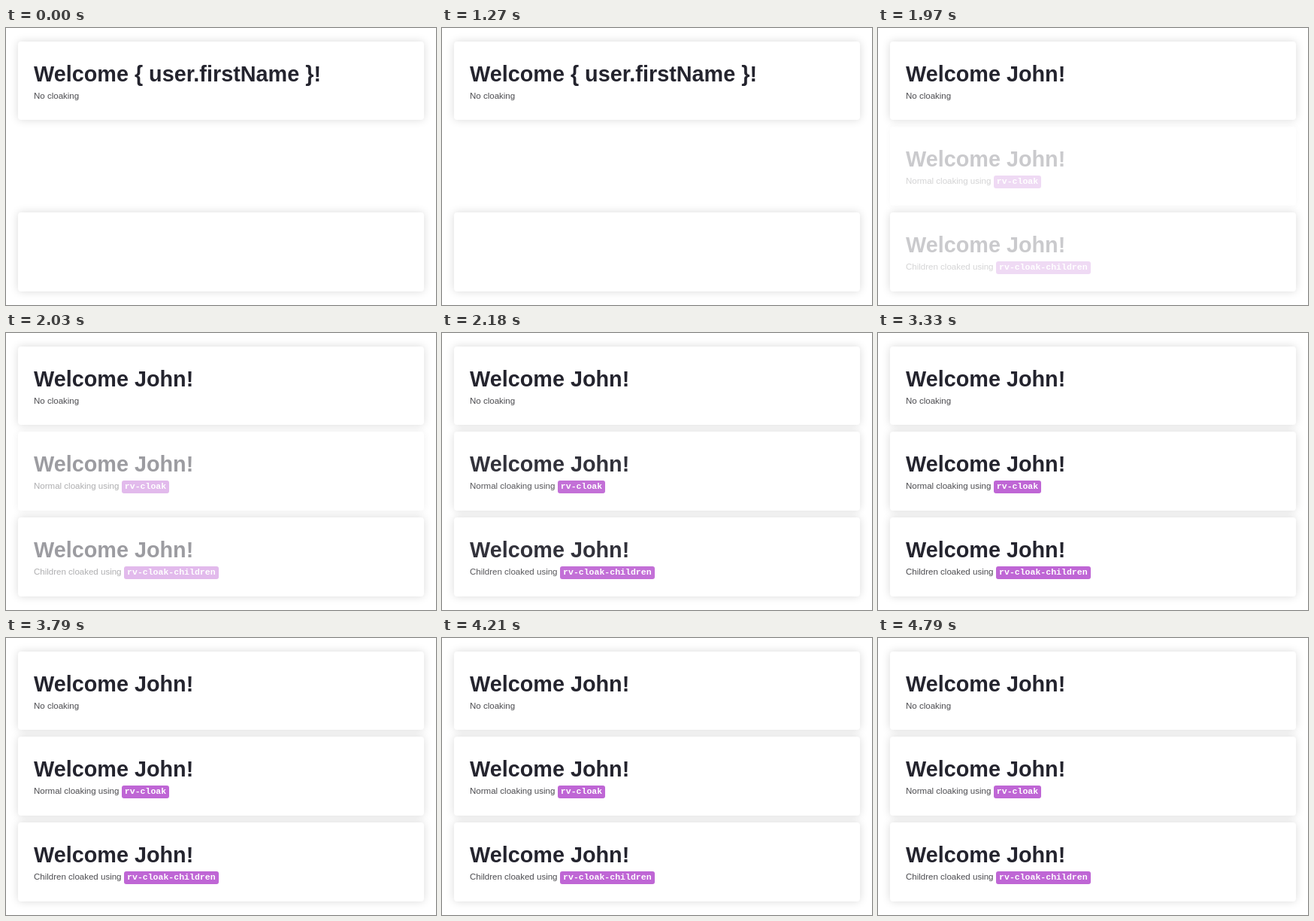
Write an HTML page that moves like this. It is 572x368 px and loops after 4.82 s.

```html
<!DOCTYPE html>
<html lang="en">
<head>
<meta charset="utf-8">
<title>Cloaking demo</title>
<style>
  html, body { margin: 0; width: 100%; height: 100%; overflow: hidden; background: #fff; }
  body { position: relative; font-family: "Liberation Sans", Arial, sans-serif; }
  .card {
    position: absolute; left: 16px; width: 540px; height: 105px;
    background: #fff; border-radius: 4px; box-shadow: 0 0 12px rgba(0, 0, 0, .15);
  }
  h1, p { position: absolute; left: 21px; margin: 0; white-space: nowrap; }
  h1 { top: 27px; font: bold 28.8px/32px "Liberation Sans", Arial, sans-serif; color: #24242e; }
  p { top: 66px; font-size: 11.52px; line-height: 12px; color: #4c4c50; }
  code {
    padding: 1px 4.35px 3px; border-radius: 3px; background: #bf66d5; color: #fff;
    font: bold 11.52px/0 "Liberation Mono", "Courier New", monospace;
  }
</style>
</head>
<body>
<div class="card" style="top:18px; height:104px">
  <h1 id="greeting"></h1>
  <p>No cloaking</p>
</div>
<div class="card cloaked" style="top:131px">
  <h1>Welcome John!</h1>
  <p>Normal cloaking using <code>rv-cloak</code></p>
</div>
<div class="card" style="top:245px">
  <div class="cloaked">
    <h1>Welcome John!</h1>
    <p>Children cloaked using <code>rv-cloak-children</code></p>
  </div>
</div>
<script>
  const LOOP = 4820, BIND_AT = 1845, FADE = 400;
  const greeting = document.getElementById('greeting');
  const cloaked = document.querySelectorAll('.cloaked');
  const easeInOut = x => x * x * (3 - 2 * x);
  const start = performance.now();

  function draw() {
    const t = (performance.now() - start) % LOOP;
    const progress = Math.min(1, Math.max(0, (t - BIND_AT) / FADE));
    const name = t < BIND_AT ? '{ user.firstName }' : 'John';
    greeting.textContent = `Welcome ${name}!`;
    for (const el of cloaked) el.style.opacity = easeInOut(progress);
    requestAnimationFrame(draw);
  }
  draw();
</script>
</body>
</html>
```
